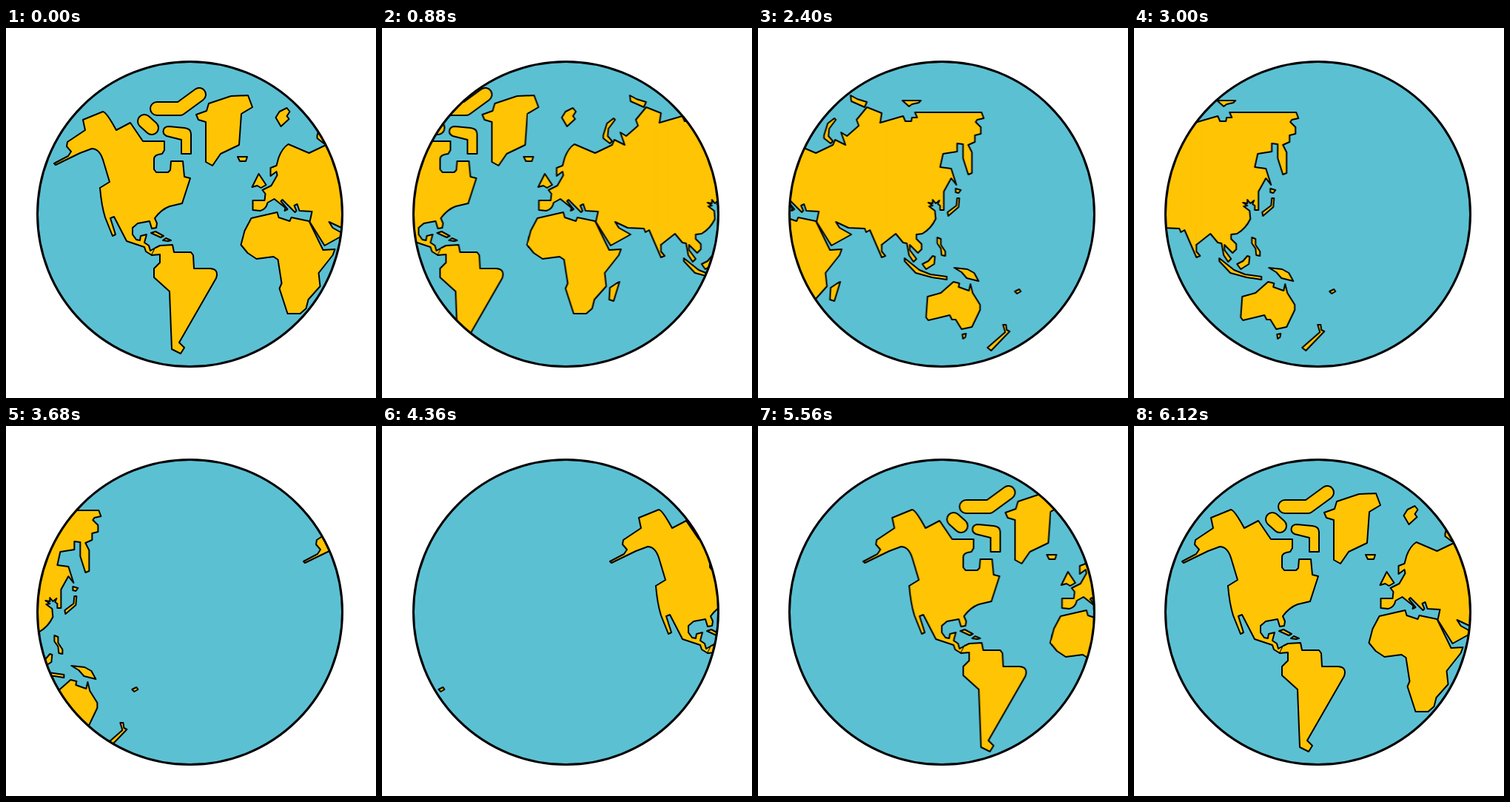
Write an HTML page without scripts that moves like this. It is 500 px wide and 500 px high and loops after 6.16 s.

```html
<!DOCTYPE html>
<html lang="en">
<head>
<meta charset="utf-8">
<title>Spinning globe</title>
<style>
html, body { margin: 0; width: 100%; height: 100%; overflow: hidden; background: #fff; }
svg { display: block; width: 100%; height: 100%; }
.land { fill: #ffc404; stroke: #000; stroke-width: 2; stroke-linejoin: round; stroke-linecap: round; }
.plain { stroke: none; }
.rim, .core { fill: none; stroke-width: 20; }
.core { stroke: #ffc404; stroke-width: 16; }
.map { animation: spin 6160ms infinite; }
/* one full turn in 40 ms steps, then a short rest */
@keyframes spin {
  0% { transform: translateX(0); animation-timing-function: steps(153, end); }
  99.35%, 100% { transform: translateX(-845px); }
}
</style>
</head>
<body>
<svg viewBox="0 0 500 500">
  <defs>
    <clipPath id="disc"><circle cx="248.5" cy="251.5" r="206"/></clipPath>
    <path id="pills" d="M204 109 H235 L261 90 M187 126 L197 135"/>

    <g id="america" class="land">
      <path d="M127 216 L140 208 131 178 Q126 163 116 163 L100 169 67 185 65 183 84 173 88 167 82 160 83 154
        107 138 104 124 131 113 Q136 114 149 138 L168 128 185 153 H214 V165 L211 170 Q200 171 200 177 V191
        L203 195 H219 L222 192 223 180 H239 L241 201 249 203 238 237"/>
      <path d="M238 237 L221 241 Q210 245 201 257 L204 264 203 270 197 271 194 261 178 264 171 270 V279
        L176 286 181 287 182 281 190 279 187 290 193 294 195 301 202 297 197 307 189 302 187 296 163 288
        146 255 141 257 148 279 144 281 134 256 Q129 240 127 216"/>
      <path class="plain" d="M132 218 L200 215 235 234 200 240 Z"/>
      <path d="M202 297 L208 294 225 293 227 303 H250 L253 307 254 325 H276 Q288 326 284 338 L234 425
        241 432 236 440 224 434 221 356 200 337 V325 L208 317 V306 L197 307"/>
      <path d="M196 277 L202 275 213 281 209 283 Z M212 287 L216 284 223 287 219 288 Z"/>
      <use href="#pills" class="rim"/>
      <use href="#pills" class="core"/>
      <path d="M220 133 L241 135 Q250 136 250 143 V170 H237 V151 L217 146 Q211 143 213 137 Q215 133 220 133 Z"/>
      <path d="M257 117 L271 112 274 102 304 92 327 91 333 107 318 116 315 158 290 170 279 186 270 181 V127 L260 124 Z"/>
      <path d="M313 174 H326 L324 180 H316 Z"/>
    </g>

    <g id="europe" class="land" transform="translate(121.5)">
      <path d="M258 108 L262 113 258 119 261 123 250 133 243 121 248 113 Z"/>
      <path d="M220 197 L230 212 223 216 218 213 211 215 Z"/>
      <path d="M375 128 L377 115 357 107 343 124 346 132 330 146 322 141 328 158 314 151 311 158 288 169 260 157
        Q252 162 247 175 L244 186 236 189 V200 L244 194 245 199 237 213 225 219 229 224 228 233 H212 V246
        L222 247 Q230 245 232 236 L241 231 256 243 255 247 259 245 250 234 252 232 269 249 271 247 268 240
        272 238 275 247 292 248 289 262 309 294 336 279 320 270 315 262 332 270 354 271 356 276 361 273
        377 310 382 308 377 302 V293"/>
      <path d="M210 257 L245 249 247 256 262 261 264 256 288 261 307 300 323 299 320 307 301 331 303 349 287 367
        284 379 276 386 H259 L248 352 251 345 246 313 240 309 217 312 205 304 196 293 201 274 Z"/>
      <path d="M321 343 L313 369 307 367 308 351 317 345 Z"/>
      <path d="M299 145 L304 129 313 122 315 124 306 136 305 146 311 153 308 156 299 149 Z"/>
    </g>

    <g id="asia" class="land" transform="translate(331.4)">
      <path d="M165 128 L196 119 199 126 H207 L208 121 H215 L212 114 H302 L305 122 296 124 294 127 301 134
        V143 L293 145 V154 L284 158 289 168 V196 L284 198 277 176 V157 L269 156 V167 L250 170 246 188 261 190
        268 212 261 203 251 221 V246 H246 V240 L243 238 245 233 240 237 236 232 V237 L230 236 236 240 231 241
        239 247 240 258 Q234 271 222 278 L214 279 V285 L221 292 V299 L216 304 205 293 V300 L214 312 210 316
        204 307 201 291 196 290 186 278 167 293"/>
      <path class="plain" d="M160 131 H175 V270 H160 Z"/>
      <path d="M125 91 L134 96 147 100 144 107 126 99 Z M195 98 H220 L217 101 208 103 204 106 Z"/>
      <path d="M269 230 H272 L271 242 257 254 256 249 268 240 Z M267 217 L274 219 271 223 267 222 Z"/>
      <path d="M198 311 L218 327 233 333 255 336 V340 L235 337 213 331 198 315 Z"/>
      <path d="M222 319 L230 315 236 308 239 309 238 319 227 326 Z"/>
      <path d="M242 283 L247 285 V293 L253 302 V308 L248 307 247 298 242 291 Z"/>
      <path d="M265 324 L283 326 292 331 298 342 282 338 275 330 Z"/>
      <path d="M229 363 L247 358 264 343 272 345 271 350 285 355 287 346 290 358 300 374 V381 L289 404 275 407
        267 394 H262 L259 388 230 395 227 391 Z"/>
      <path d="M276 414 L281 413 280 418 277 420 Z M331 401 H335 L336 408 340 410 315 436 310 432 334 411 Z"/>
      <path d="M347 356 L353 353 355 356 350 359 Z"/>
    </g>

    <g id="world">
      <use href="#america"/>
      <use href="#europe"/>
      <use href="#asia"/>
    </g>
  </defs>

  <circle cx="248.5" cy="251.5" r="206" fill="#5cc0d3"/>
  <g clip-path="url(#disc)">
    <g class="map">
      <use href="#world"/>
      <use href="#world" x="845"/>
    </g>
  </g>
  <circle cx="248.5" cy="251.5" r="206" fill="none" stroke="#000" stroke-width="3"/>
</svg>
</body>
</html>
```
